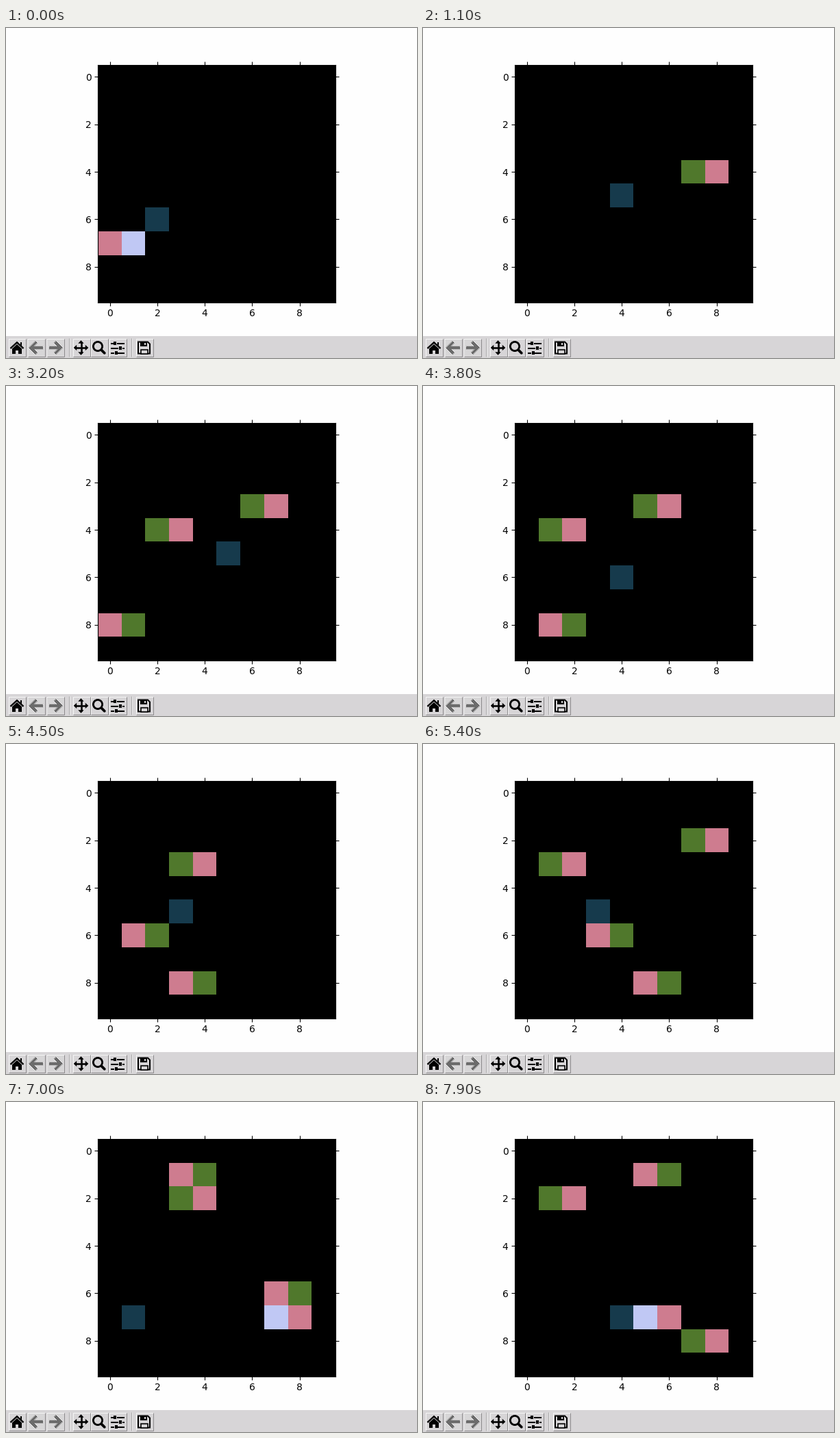
Recreate the animation shown at these times as a matplotlib script. Size 600 by 482 pixels, loop 8000 ms.

```python
import numpy as np
import matplotlib.pyplot as plt
from matplotlib.animation import FuncAnimation
from matplotlib.patches import Circle, Polygon, Rectangle

W, H, DPI = 600, 482, 100
BAR = 32
STEP, FRAMES = 100, 80
PX = 72 / DPI
PAPER, PANEL = "#fefefe", "#d7d5d7"

CELLS = 10
PLAYER = (22, 58, 76)
BODY = (206, 124, 143)
HEAD = (80, 120, 44)
PRIZE = (192, 200, 244)

# A new walker enters on every second beat: its row, signed by its direction.
ENTRIES = [7, -4, -5, -3, 8, 6, -2, 1, -7, -8]
PRIZES = {0, 2, 8}

# The player's key positions: time in ms, column, row
ROUTE = np.array([
    (0, 2, 6), (200, 2, 7), (400, 2, 7), (700, 4, 6), (1000, 4, 6),
    (1100, 4, 5), (1400, 2, 5), (2000, 4, 5), (2400, 5, 5), (3300, 5, 5),
    (3700, 4, 6), (4300, 4, 6), (4400, 3, 5), (5800, 3, 5), (6200, 2, 7),
    (7000, 1, 7), (7800, 4, 7),
])


def beat_time(n):
    """Walkers advance about every 425 ms, with a slight swing."""
    return 200 + 425 * n + 40 * abs(np.sin(np.pi * n / 8))


def player_at(t):
    times, cols, rows = ROUTE.T
    return int(np.interp(t, times, cols)), int(np.interp(t, times, rows))


def head_at(way, age):
    return 1 + age if way > 0 else CELLS - 2 - age


def board(t):
    grid = np.zeros((CELLS, CELLS, 3), np.uint8)
    beat = -1
    while beat_time(beat + 1) <= t:
        beat += 1
    for i, entry in enumerate(ENTRIES):
        born, row, way = 2 * i - 1, abs(entry), np.sign(entry)
        caught = i in PRIZES and any(
            player_at(beat_time(n)) == (head_at(way, n - born), row)
            for n in range(born, beat + 1))
        head = head_at(way, beat - born)
        if beat >= born and not caught and 0 <= head < CELLS:
            grid[row, head] = PRIZE if i in PRIZES else HEAD
            grid[row, head - way] = BODY
    col, row = player_at(t)
    grid[row, col] = PLAYER
    return grid


fig = plt.figure(figsize=(W / DPI, H / DPI), dpi=DPI, facecolor=PAPER)

# Toolbar, drawn in pixel coordinates with y pointing down
bar = fig.add_axes([0, 0, 1, BAR / H])
bar.set_axis_off()
MID = 467


def line(xs, ys, width=1, colour="black", cap="butt"):
    bar.plot(xs, ys, color=colour, lw=width * PX, solid_capstyle=cap,
             solid_joinstyle="miter")


def shape(points):
    bar.add_patch(Polygon(points, fc="black", ec="none"))


def box(x0, y0, x1, y1, fill="black", edge="none", width=0):
    bar.add_patch(Rectangle((x0, y0), x1 - x0, y1 - y0, fc=fill, ec=edge,
                            lw=width * PX, zorder=3))


def button(x0):
    x1, top, bottom = x0 + 25, 453.5, 479.5
    line([x0, x0, x1], [bottom, top, top], colour="#f6f6f6")
    line([x0, x1, x1], [bottom, bottom, top], colour="#8c8a8c")


def separator(x):
    line([x, x], [453, 480], colour="#a9a7a9")
    line([x + 1, x + 1], [453, 480], colour="#eeeeee")


def home(cx=16):
    line([cx - 9.5, cx, cx + 9.5], [MID + 1, MID - 7.7, MID + 1], 2.4)
    shape([(cx - 7, MID + 1.5), (cx, MID - 5), (cx + 7, MID + 1.5)])
    for side in (-1, 1):
        box(cx + 4.5 * side - 2.5, MID + 1, cx + 4.5 * side + 2.5, MID + 8.5)
    box(cx - 2, MID + 1, cx + 2, MID + 3.5)
    box(cx + 4.5, MID - 8.5, cx + 7, MID - 3)


def disabled_arrow(cx, way):
    tip = cx + 8 * way
    line([cx - 9.5 * way, tip - way], [MID, MID], 4.4)
    line([tip - 8.5 * way, tip, tip - 8.5 * way],
         [MID - 8.5, MID, MID + 8.5], 4)
    stipple = np.ones((24, 24, 4)) * (0xd7 / 255)
    stipple[..., 3] = np.indices((24, 24)).sum(0) % 2
    bar.imshow(stipple, extent=(cx - 12, cx + 12, MID + 12, MID - 12),
               interpolation="nearest", aspect="auto", zorder=4)


def move(cx=109.5):
    for dx, dy in ((1, 0), (-1, 0), (0, 1), (0, -1)):
        line([cx, cx + 8 * dx], [MID, MID + 8 * dy], 2.6)
        base = np.array([cx + 6.3 * dx, MID + 6.3 * dy])
        side = 4.2 * np.array([dy, dx])
        shape([base + side, base - side,
               (cx + 10.8 * dx, MID + 10.8 * dy)])


def zoom(cx=134, cy=465):
    bar.add_patch(Circle((cx, cy), 6.6, fc="none", ec="black", lw=2.8 * PX))
    line([cx + 5.3, cx + 9.8], [cy + 5.3, cy + 9.8], 3.8, cap="round")


def sliders(left=153, right=173):
    for y, knob in ((460.5, 159.3), (467.5, 167.2), (474.5, 160.6)):
        line([left, right], [y, y], 2)
        box(knob - 2.8, y - 2.4, knob + 2.8, y + 2.4, PANEL)
        box(knob - 2, y - 2.4, knob + 2, y + 2.4)


def save():
    line([193, 193, 207, 210, 210, 192], [476, 458.5, 458.5, 461.5, 475.5,
                                          475.5], 2)
    box(197, 469.5, 206.5, 475.5, PANEL, "black", 1.6)
    box(196.3, 458, 205.5, 464.8)
    box(201.5, 459.5, 203.7, 463.3, PANEL)


for left in (3, 31, 59, 97, 123, 150, 189):
    button(left + 0.5)
separator(91.5)
separator(182.5)
home()
disabled_arrow(44, -1)
disabled_arrow(72, 1)
move()
zoom()
sliders()
save()
bar.add_patch(Rectangle((0, H - BAR), W, BAR, fc=PANEL, ec="none", zorder=-5))
bar.set_xlim(0, W)
bar.set_ylim(H, H - BAR)

# Game board, kept just off the half pixel so that image and frame line up
ax = fig.add_axes([0.125, (BAR + 49.4) / H, 0.775, 346.5 / H])
image = ax.imshow(board(0), interpolation="nearest")
ax.set_xticks(range(0, CELLS, 2))
ax.set_yticks(range(0, CELLS, 2))
ax.tick_params(top=True, right=True, labelsize=10,
               labelfontfamily="DejaVu Sans")


def update(i):
    image.set_data(board(i % FRAMES * STEP))
    return [image]


anim = FuncAnimation(fig, update, frames=FRAMES, interval=STEP, repeat=True,
                     repeat_delay=0, blit=False)
plt.show()
```
